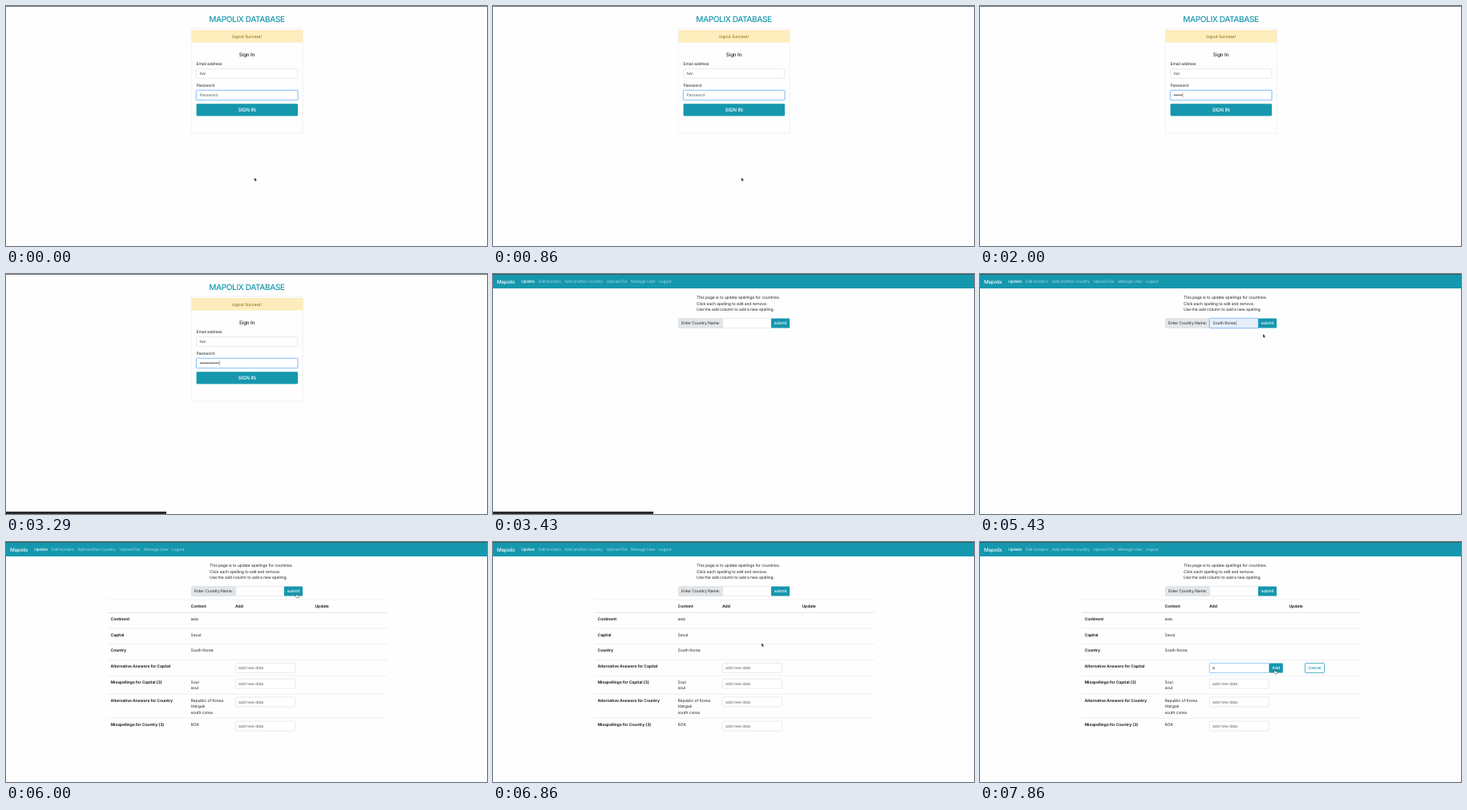
Animation, 600 px wide and 300 px high, one loop 8000 ms. Source, as an HTML page:

```html
<!DOCTYPE html>
<html lang="en">
<head>
<meta charset="utf-8">
<title>Database admin</title>
<style>
  html, body { margin: 0; width: 100%; height: 100%; overflow: hidden; background: #fefefe; }
  svg { display: block; width: 600px; height: 300px; }
  text {
    font: 5px Inter, "Open Sans", sans-serif;
    letter-spacing: -.08px;
    fill: #212529;
    text-rendering: geometricPrecision;
    white-space: pre;
  }
  .bold { font-weight: 700; letter-spacing: -.06px; }
  .medium { font-weight: 500; }
  .mid { text-anchor: middle; }
  .hint { fill: #5c636a; }
  .white { fill: #fff; }
  .teal { fill: #1597ae; }
  .amber { fill: #856404; }
  .link { fill: #a9d9e2; }
  .title { font-size: 10px; font-weight: 500; letter-spacing: -.36px; }
  .head { font-size: 6.25px; font-weight: 500; letter-spacing: -.16px; }
  .option { font-size: 4.06px; font-weight: 500; letter-spacing: 0; fill: #f2f2f2; }
</style>
</head>
<body>
<svg id="stage" viewBox="0 0 600 300"></svg>
<script>
const TEAL = '#1597ae';
const TICKS = 56, RATE = 7, LOOP = 8000;

const text = (x, y, str, cls = '', id = '') =>
  `<text x="${x}" y="${y}" class="${cls}" id="${id}">${str}</text>`;
const rect = (x, y, w, h, fill, extra = '') =>
  `<rect x="${x}" y="${y}" width="${w}" height="${h}" fill="${fill}" ${extra}/>`;
const line = (x1, x2, y, w = .5, color = '#dadde0') =>
  `<path d="M${x1} ${y}H${x2}" stroke="${color}" stroke-width="${w}"/>`;
const group = (id, body) => `<g id="${id}">${body}</g>`;
const input = (x, y, w, h, fill = '#fff') =>
  rect(x, y, w, h, fill, 'rx="1" stroke="#ced4da" stroke-width=".5"');
const focused = (x, y, w, h, glow = '') =>
  rect(x - .5, y - .5, w + 1, h + 1, 'none',
    `id="${glow}" rx="1.4" stroke="#007bff" stroke-opacity=".25" stroke-width="1.2"`) +
  rect(x, y, w, h, '#fff', 'rx="1" stroke="#6cb0f5" stroke-width=".6"');
const caret = (id, x, y, color = '#333') => rect(x, y, .4, 6, color, `id="${id}"`);

function loginPage() {
  return line(0, 600, .4, .8, '#444') +
    text(300.5, 20.4, 'MAPOLIX DATABASE', 'title teal mid') +
    rect(231.2, 28, 139, 131, 'none', 'rx="1" stroke="#e2e2e2" stroke-width=".5"') +
    rect(231.5, 30, 138.8, 15.6, '#fdecbc', 'rx="1"') +
    text(300.5, 40, 'logout Success!', 'amber mid') +
    text(300.5, 63.3, 'Sign In', 'head mid') +
    text(237.5, 73.8, 'Email address') +
    input(237.6, 78.6, 126.2, 11.8) +
    text(241.5, 86.3, 'ruv') +
    text(237.5, 101, 'Password') +
    focused(237.6, 105.5, 126.2, 11.8) +
    text(241.5, 113.2, 'Password', 'hint', 'passHint') +
    group('dots', Array.from({ length: 11 }, (_, i) =>
      `<circle cx="${242.6 + 2.2 * i}" cy="111.4" r=".78" fill="#333"/>`).join('')) +
    caret('passCaret', 0, 108.3) +
    rect(237.5, 122.2, 126.5, 15.2, TEAL, 'rx="1.3"') +
    text(300.5, 132.1, 'SIGN IN', 'head white mid');
}

function updatePage() {
  const links = [[57, 'Edit borders'], [89.5, 'Add another country'], [141.5, 'Upload File'],
                 [172, 'Manage User'], [206.5, 'Logout']];
  const intro = ['This page is to update spellings for countries.',
                 'Click each spelling to edit and remove.',
                 'Use the add column to add a new spelling.'];
  const options = ['South Korea', 'japan', 'Japan', 'testCountry', 'Algeria', 'Ukraine'];
  return rect(0, 0, 600, 18, TEAL) + line(0, 600, .4, .8, '#2f5058') +
    text(5, 11.7, 'Mapolix', 'head white') +
    text(35.2, 11.3, 'Update', 'white medium') +
    links.map(([x, s]) => text(x, 11.3, s, 'link')).join('') +
    intro.map((s, i) => text(254, 31.2 + 7.5 * i, s)).join('') +
    input(231.3, 55.6, 55.2, 11.9, '#e3e6e8') +
    text(235, 63.4, 'Enter Country Name:') +
    input(286.5, 55.6, 60.3, 11.9) +
    rect(347, 55.6, 23, 11.9, TEAL, 'rx=".6"') +
    text(358.5, 63.4, 'submit', 'white medium mid') +
    group('search', focused(286.5, 55.6, 60.3, 11.9)) +
    group('filled', rect(287, 56.1, 59.3, 10.9, '#e6eef8') +
      text(290.5, 63.4, 'South Korea') + caret('', 319.3, 58.6)) +
    caret('searchCaret', 290.4, 58.6, '#666') +
    group('menu', rect(286.2, 68, 61, 72.5, '#242424', 'rx="1.2"') +
      rect(286.2, 71, 61, 10.6, '#474747', 'id="hover"') +
      options.map((s, i) => text(290, 77.6 + 11.3 * i, s, 'option')).join(''));
}

function table() {
  // label, text centre, content lines, top of the add field
  const rows = [
    ['Continent', 96.2, ['asia']],
    ['Capital', 115.8, ['Seoul']],
    ['Country', 135.5, ['South Korea']],
    ['Alternative Answers for Capital', 155.3, [], 151.5],
    ['Misspellings for Capital (3)', 175, ['Soul', 'soul'], 171.1],
    ['Alternative Answers for Country', 197.8, ['Republic of Korea', 'Hanguk', 'south corea'], 193.9],
    ['Misspellings for Country (3)', 228, ['ROK'], 224.1]
  ];
  const field = y => input(286.3, y, 74.4, 12) + text(290, y + 7.7, 'add new data', 'hint');
  return [72.2, 108, 127.7, 147.4, 167.2, 190, 220.2].map(y => line(127, 475.5, y)).join('') +
    line(127, 475.5, 88.3, .8) +
    [[230.5, 'Content'], [286, 'Add'], [385.5, 'Update']].map(([x, s]) => text(x, 82.2, s, 'bold')).join('') +
    rows.map(([label, y, content, top]) =>
      text(130.5, y + 1.8, label, 'bold') +
      content.map((s, i) => text(230.5, y + 1.8 + 7.5 * i, s)).join('') +
      (top ? field(top) : '')).join('') +
    group('edit', focused(286.3, 151.5, 74.4, 12, 'addGlow') +
      text(290, 159.2, 'add new data', 'hint', 'addHint') +
      text(290, 159.2, 'a', '', 'typed') +
      caret('addCaret', 290, 154.4) +
      rect(360.7, 151.5, 17.1, 12, TEAL, 'rx=".6"') + text(369.2, 159.2, 'Add', 'white medium mid') +
      rect(405.5, 151.5, 24, 12, '#fff', `rx="1" stroke="${TEAL}" stroke-width=".7"`) +
      text(417.5, 159.2, 'Cancel', 'teal medium mid'));
}

const pointers = {
  arrow: '<path d="M0 0V4.6L1.1 3.6L1.8 5.2L2.6 4.9L1.9 3.3H3.3Z" fill="#111" stroke="#fff" stroke-width=".35"/>',
  beam: '<path d="M-1-2.4Q0-2.4 0-1.6Q0-2.4 1-2.4M0-1.8V2M-1 2.6Q0 2.6 0 1.8Q0 2.6 1 2.6" fill="none" stroke="#222" stroke-width=".6"/>',
  hand: '<path d="M0 .4Q.5-.2 1 .4V2L3.3 2.5Q3.9 2.8 3.7 3.7L3.2 5.4H.8L-.8 3.3Q-.9 2.6 0 3Z" fill="#fff" stroke="#222" stroke-width=".45"/>'
};

document.getElementById('stage').innerHTML = rect(0, 0, 600, 300, '#fefefe') +
  group('login', loginPage()) +
  group('update', updatePage() + group('table', table())) +
  group('status', rect(0, 297, 200, 3, '#2b2b2b')) +
  group('pointer', Object.entries(pointers).map(([k, v]) => group(k, v)).join(''));

const $ = id => document.getElementById(id);
const show = (id, on) => $(id).style.display = on ? '' : 'none';
const within = (n, a, b) => n >= a && n < b;

// tick at which each password dot appears
const dotTicks = [7, 9, 11, 13, 14, 16, 17, 19, 20, 20, 21];

// tick, x, y, shape
const path = [
  [0, 309.8, 214.4, 'arrow'], [7, 309.8, 214.4, ''], [26, 309.8, 214.4, 'arrow'],
  [30, 309.4, 61.7, 'beam'], [33, 309.4, 61.7, 'beam'],
  [34, 308, 70, 'arrow'], [35, 306, 76, 'arrow'], [36, 306, 76, 'arrow'],
  [38, 353, 75, 'arrow'], [40, 361.8, 64.4, 'hand'], [46, 361.8, 64.4, 'hand'],
  [47, 350, 95, 'arrow'], [49, 320, 157.5, 'beam'], [52, 320, 157.5, 'beam'],
  [54, 365, 159.4, 'hand'], [55, 367, 159.4, 'hand']
];

function movePointer(n) {
  const i = path.findLastIndex(k => k[0] <= n);
  const a = path[i], b = path[i + 1] || a;
  const p = b === a ? 0 : (n - a[0]) / (b[0] - a[0]);
  const x = a[1] + (b[1] - a[1]) * p, y = a[2] + (b[2] - a[2]) * p;
  $('pointer').setAttribute('transform', `translate(${x} ${y})`);
  for (const k in pointers) show(k, k === a[3]);
}

function draw(n) {
  const dots = dotTicks.filter(t => t <= n).length;
  show('login', n < 24);
  show('update', n >= 24);
  show('status', within(n, 23, 29));
  show('passHint', !dots);
  [...$('dots').children].forEach((d, i) => d.style.display = i < dots ? '' : 'none');
  show('passCaret', dots);
  $('passCaret').setAttribute('x', 241.8 + 2.2 * dots);

  show('search', within(n, 31, 42));
  show('searchCaret', within(n, 31, 36));
  show('menu', within(n, 32, 36));
  show('hover', n >= 35);
  show('filled', within(n, 36, 42));

  show('table', n >= 42);
  show('edit', n >= 50);
  show('addHint', n < 52);
  show('typed', n >= 52);
  show('addCaret', n < 55);
  show('addGlow', n < 55);
  $('addCaret').setAttribute('x', n < 52 ? 289.6 : 293);
  movePointer(n);
}

const start = performance.now();
let last = -1;
function frame() {
  const t = (performance.now() - start) % LOOP;
  const n = Math.min(TICKS - 1, Math.floor((t + 5) * RATE / 1000));
  if (n !== last) draw(last = n);
  requestAnimationFrame(frame);
}
frame();
</script>
</body>
</html>
```
